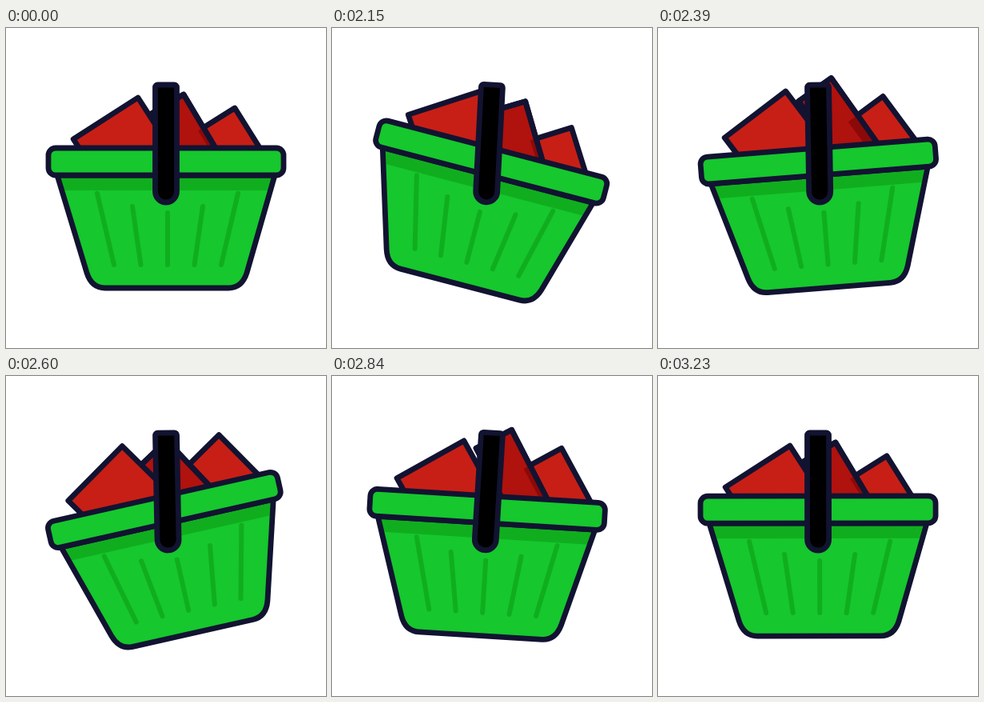
Write an HTML page with a canvas that moves like this. It is 400 px wide and 400 px high and loops after 3.29 s.

```html
<!DOCTYPE html>
<html lang="en">
<head>
<meta charset="utf-8">
<title>Swinging basket</title>
<style>
  html, body { margin: 0; width: 100%; height: 100%; overflow: hidden; background: #fff; }
  canvas { display: block; width: 400px; height: 400px; }
</style>
</head>
<body>
<canvas id="stage"></canvas>
<script>
const LOOP = 3290, REST = 2030, STEP = 30;
const START = 2000, BEAT = 250, HOP = 400;
const NAVY = '#121331', GREEN = '#16c72e', SHADE = '#10ae1f';
const RED = '#c71f16', CRIMSON = '#b0120e', OVERLAP = '#8c0909';

const canvas = document.getElementById('stage');
const ctx = canvas.getContext('2d');
const ratio = window.devicePixelRatio || 1;
canvas.width = canvas.height = 400 * ratio;

const ease = x => (1 - Math.cos(Math.PI * x)) / 2;

// Eased swing that reaches one peak per beat
function swing(peaks, t) {
  const x = (t - START) / BEAT;
  if (x <= 0 || x >= peaks.length - 1) return 0;
  const i = Math.floor(x);
  return peaks[i] + (peaks[i + 1] - peaks[i]) * ease(x - i);
}
const basketTilt = t => swing([0, 22.4, -23, 6.8, -4.5, 0], t);
const handleTilt = t => swing([0, 4.5, -4.7, 5.7, -1.8, 0], t);

// Every box hops twice, each one later than its left neighbour
function hop(delay, t) {
  const x = (t - START - delay) / HOP;
  return x > 0 && x < 2 ? 19 * ease(2 * x) : 0;
}

// A tilted box hanging from its top right corner
function box(fill, x, y, angle, w, h, delay) {
  const flat = new Path2D(), path = new Path2D();
  flat.rect(-w, 0, w, h);
  path.addPath(flat, new DOMMatrix().translate(x, y).rotate(angle));
  return { fill, path, delay };
}
const leftBox = box(RED, 165, 87, -32.7, 96, 100, 100);
const midBox = box(CRIMSON, 222, 83, -30.8, 50, 100, 200);
const rightBox = box(RED, 286, 100, -32, 54, 80, 300);

const body = new Path2D('M64 184L101 306Q107 325 124 325H278Q295 325 301 306L336 184Z');
const band = new Path2D('M65 184H335L329.5 203H70.5Z');
const rim = new Path2D();
rim.roundRect(53, 150, 294, 34, 9);
const handle = new Path2D();
handle.roundRect(186.5, 71, 27, 147, [3, 3, 13.5, 13.5]);
const slats = new Path2D();
for (let i = -2; i <= 2; i++) {
  slats.moveTo(202 + 44 * i, 231 - 8 * Math.abs(i) ** 1.6);
  slats.lineTo(202 + 33.5 * i, 296);
}

function outline(path, color, width = 6.8) {
  ctx.strokeStyle = color;
  ctx.lineWidth = width;
  ctx.stroke(path);
}

function fill(path, color) {
  ctx.fillStyle = color;
  ctx.fill(path);
}

function paint(path, color) {
  fill(path, color);
  outline(path, NAVY);
}

function rotate(deg, x, y) {
  ctx.translate(x, y);
  ctx.rotate(deg * Math.PI / 180);
  ctx.translate(-x, -y);
}

function lift(item, t, sign = 1) {
  const h = hop(item.delay, t) * sign;
  ctx.translate(0.13 * h, -h);
}

function group(draw) {
  ctx.save();
  draw();
  ctx.restore();
}

function drawBox(item, t) {
  group(() => {
    lift(item, t);
    paint(item.path, item.fill);
  });
}

function drawBoxes(t) {
  drawBox(rightBox, t);
  drawBox(midBox, t);
  // Darken the part of the middle box that covers the right one
  group(() => {
    lift(midBox, t);
    group(() => {
      ctx.clip(midBox.path);
      lift(midBox, t, -1);
      lift(rightBox, t);
      fill(rightBox.path, OVERLAP);
    });
    outline(midBox.path, NAVY);
  });
  drawBox(leftBox, t);
}

function drawBasket() {
  fill(body, GREEN);
  fill(band, SHADE);
  outline(slats, SHADE, 6);
  outline(body, NAVY);
  paint(rim, GREEN);
}

function render(t) {
  ctx.setTransform(ratio, 0, 0, ratio, 0, 0);
  ctx.fillStyle = '#fff';
  ctx.fillRect(0, 0, 400, 400);
  ctx.lineCap = ctx.lineJoin = 'round';
  const tilt = handleTilt(t);
  rotate(tilt, 200, 72);
  group(() => {
    rotate(basketTilt(t) - tilt, 200, 187);
    drawBoxes(t);
    drawBasket();
  });
  paint(handle, '#000');
}

// The swing advances in fixed steps after the rest
function frame() {
  const t = performance.now() % LOOP;
  render(t < REST ? 0 : REST + Math.floor((t - REST) / STEP) * STEP);
  requestAnimationFrame(frame);
}
frame();
</script>
</body>
</html>
```
